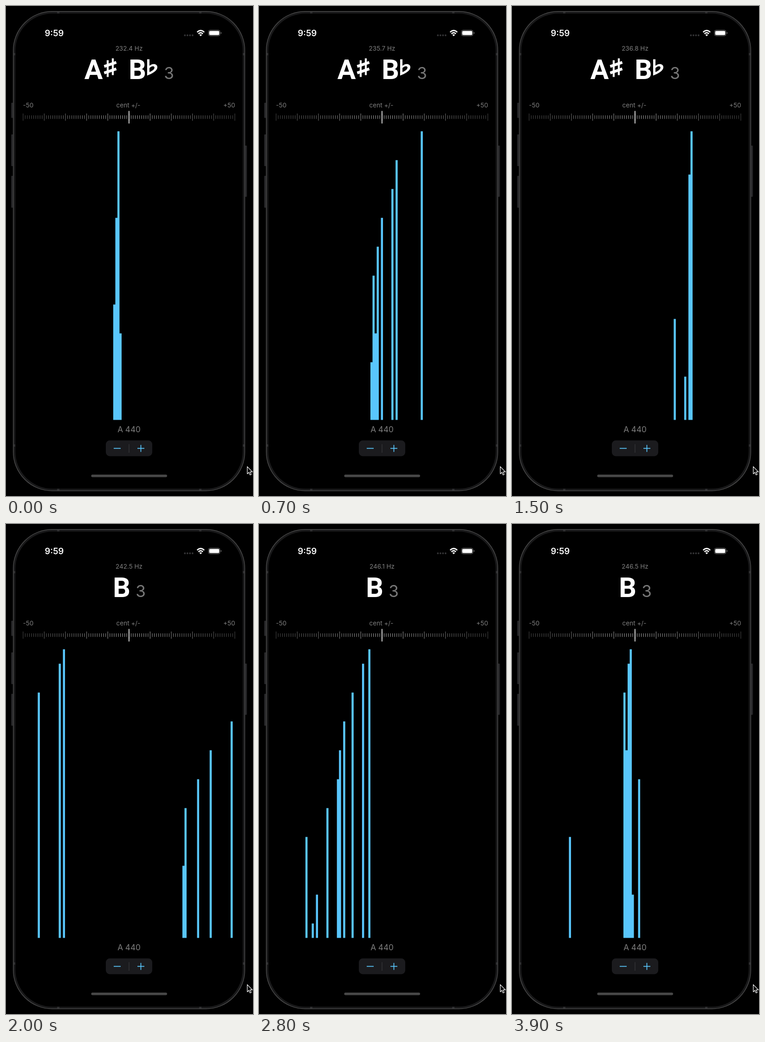
Animation of 532 by 1053 pixels, one loop 4 s. Source, as an HTML page:

```html
<!DOCTYPE html>
<html lang="en">
<head>
<meta charset="utf-8">
<title>Tuner</title>
<style>
  html, body { margin: 0; width: 100%; height: 100%; overflow: hidden; background: #000; }
  svg { display: block; width: 532px; height: 1053px; }
  text { font-family: Inter, "Open Sans", sans-serif; fill: #7f7f7f; font-size: 13.5px; }
  .mid { text-anchor: middle; }
  .end { text-anchor: end; }
  .note { font: 700 59px Roboto, Inter, sans-serif; fill: #fff; text-anchor: middle; }
  .octave { font-size: 35px; text-anchor: middle; fill: #787878; }
</style>
</head>
<body>
<svg viewBox="0 0 532 1053">
  <!-- phone body -->
  <g fill="#242426">
    <rect x="11" y="208" width="5" height="32.5" rx="1"/>
    <rect x="11" y="276" width="5" height="68" rx="1"/>
    <rect x="11" y="365" width="5" height="68.5" rx="1"/>
    <rect x="514" y="300" width="5" height="110" rx="1"/>
  </g>
  <rect x="18" y="14" width="494" height="1025.5" rx="82" fill="#000" stroke="#19191a" stroke-width="4.5"/>
  <rect x="15.6" y="11.6" width="498.8" height="1030.3" rx="84" fill="none" stroke="#555" stroke-width="1.2"/>
  <g fill="#303032">
    <rect x="110" y="12.5" width="5" height="3.5"/>
    <rect x="416" y="12.5" width="5" height="3.5"/>
    <rect x="110" y="1037.5" width="5" height="3.5"/>
    <rect x="416" y="1037.5" width="5" height="3.5"/>
    <rect x="16.5" y="101" width="3.5" height="5"/>
    <rect x="510" y="101" width="3.5" height="5"/>
    <rect x="16.5" y="942" width="3.5" height="5"/>
    <rect x="510" y="942" width="3.5" height="5"/>
  </g>

  <!-- status bar -->
  <text x="83.5" y="64.5" style="font-size:18.5px;font-weight:600;fill:#fff">9:59</text>
  <g fill="#353537">
    <circle cx="385.3" cy="63" r="1.9"/><circle cx="390.8" cy="63" r="1.9"/>
    <circle cx="396.3" cy="63" r="1.9"/><circle cx="401.8" cy="63" r="1.9"/>
  </g>
  <g fill="none" stroke="#fff" stroke-width="2.6">
    <path d="M411.6 56.4Q419.3 49 427 56.4"/>
    <path d="M414.5 59.7Q419.3 55.1 424.1 59.7"/>
  </g>
  <path d="M416.5 62Q419.3 59.6 422.1 62L419.3 65Z" fill="#fff"/>
  <rect x="436" y="51.8" width="25" height="12.4" rx="3.8" fill="none" stroke="#777"/>
  <rect x="437.6" y="53.4" width="21.8" height="9.2" rx="2.4" fill="#fff"/>
  <path d="M462.6 56q1.7.6 1.7 2t-1.7 2z" fill="#777"/>

  <!-- readout -->
  <text id="hz" class="mid" x="265" y="95.5"></text>
  <g id="sharp">
    <text class="note" x="188.5" y="157">A</text>
    <g role="img" aria-label="sharp" fill="none" stroke="#fff">
      <path d="M219 116.5V152.5M230 112.5V148.5" stroke-width="4.2"/>
      <path d="M211.5 129.8L237.5 121.2M211.5 143.8L237.5 135.2" stroke-width="6"/>
    </g>
    <text class="note" x="283" y="157">B</text>
    <path role="img" aria-label="flat" fill="#fff" fill-rule="evenodd"
      d="M304 114.5H309V128.5C315 122.5 326 123.5 326 131.5C326 139.5 315 145 304 149.5ZM309 133.5V142C315 139.5 319.8 136 319.8 132.5C319.8 128.5 313.5 128.5 309 133.5Z"/>
    <text class="octave" x="351" y="156.5">3</text>
  </g>
  <g id="plain">
    <text class="note" x="249" y="157">B</text>
    <text class="octave" x="290" y="156.5">3</text>
  </g>

  <!-- cent scale -->
  <text x="36.5" y="218">-50</text>
  <text class="mid" x="263.5" y="218">cent +/-</text>
  <text class="end" x="493.5" y="218">+50</text>
  <g id="ticks" fill="#a6a6a6"></g>
  <rect x="264.1" y="225.5" width="1.6" height="27" fill="#fff"/>

  <path id="bars" fill="#59c6fc"/>

  <!-- controls -->
  <text class="mid" x="265" y="916" style="font-size:17.2px">A 440</text>
  <rect x="215" y="933.5" width="100" height="34" rx="8.5" fill="#1b1b1e"/>
  <rect x="264.4" y="941.5" width="1.2" height="18.5" fill="#3a3a3e"/>
  <path d="M232 950.7h15M283 950.7h15M290.5 943.2v15" stroke="#59c6fc" stroke-width="1.7"/>
  <rect x="183.5" y="1007" width="163.5" height="5.5" rx="2.75" fill="#474747"/>
  <path d="M519.6 989.8V1005.4L523.2 1002.2L525.6 1007.8L528.2 1006.7L525.8 1001.2H530.6Z"
    fill="#000" stroke="#fff" stroke-width="1.2" stroke-linejoin="round"/>
</svg>
<script>
const LOOP = 4000, FRAME = 100;
const LEFT = 36.8, WIDTH = 456, BINS = 101, BIN = WIDTH / BINS;
const BOTTOM = 889.6, FULL = 620.4;
const DECAY = 0.05;            // lost per tick once a bar is no longer current
const LEAD = 15;               // ticks of history before the loop starts
const FIRST_B = 29;            // reading at which the note turns to B
const A_SHARP = 233.082, B_NOTE = 246.942;

// cents off the note, one reading for every two ticks
const cents = [
  -4, -7, -6, -6, -6, -5, -5, -5, -3, -4, -4, -2, 0, 5, 7, 19,
  24, 19, 19, 26, 26, 27, 26, 26, 27.2, 27.2, 33, 39, 49,
  -43, -33, -31.2, -36, -36, -26, -21.3, -20, -18, -14, -9,
  -6, -5, -4, -3, -1, -2.4, -31, 2, 2, -4, -3, -5, -3, -2.8
];

const $ = id => document.getElementById(id);
const hz = $("hz"), bars = $("bars"), sharp = $("sharp"), plain = $("plain");

function drawTicks() {
  let out = "";
  for (let k = 0; k <= 100; k++) {
    const h = k % 10 ? 7.6 : 15.5;
    const x = LEFT + k * WIDTH / 100 - 0.5;
    const alpha = 1 - 0.6 * Math.abs(k - 50) / 50;
    out += `<rect x="${x}" y="${238.8 - h / 2}" width="1.1" height="${h}" opacity="${alpha}"/>`;
  }
  $("ticks").innerHTML = out;
}

function barPath(tick, last) {
  const levels = new Map();
  for (let i = 0; i <= last; i++) {
    const age = Math.max(0, tick - (2 * i + 1));
    const level = 1 - DECAY * age;
    if (level > 0.001) levels.set(50 + Math.trunc(cents[i]), level);
  }
  let d = "";
  for (const [bin, level] of levels) {
    const x = LEFT + bin * BIN;
    d += `M${x} ${BOTTOM}h${BIN}v${-FULL * level}h${-BIN}z`;
  }
  return d;
}

function draw(frame) {
  const tick = LEAD + Math.floor(frame * 7 / 3 + 0.5);
  const last = tick >> 1;
  const isB = last >= FIRST_B;
  const pitch = (isB ? B_NOTE : A_SHARP) * 2 ** (cents[last] / 1200);
  hz.textContent = pitch.toFixed(1) + " Hz";
  sharp.style.display = isB ? "none" : "";
  plain.style.display = isB ? "" : "none";
  bars.setAttribute("d", barPath(tick, last));
}

let shown = -1;
function loop() {
  const frame = Math.floor(performance.now() % LOOP / FRAME);
  if (frame !== shown) draw(shown = frame);
  requestAnimationFrame(loop);
}

drawTicks();
loop();
</script>
</body>
</html>
```
